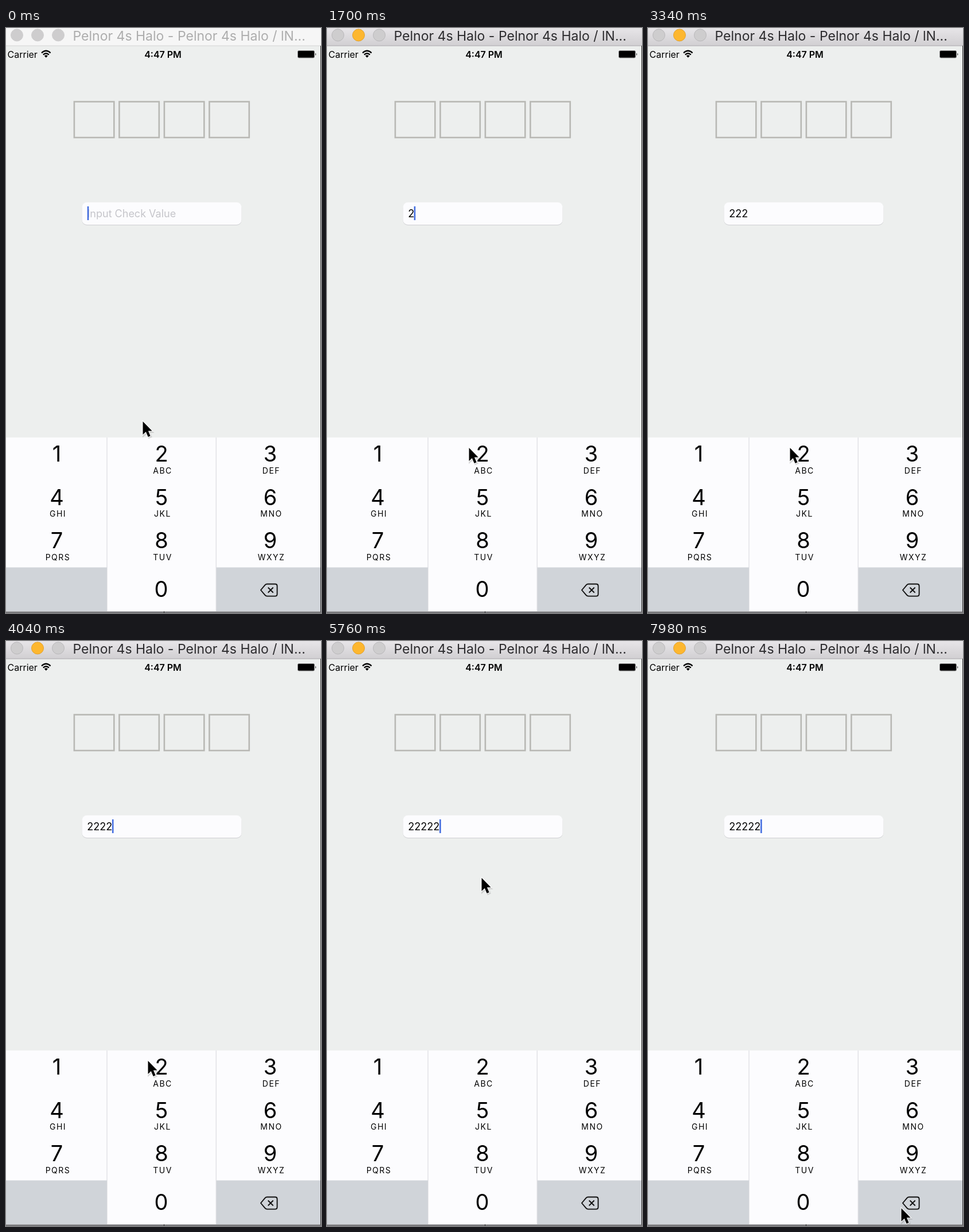
An HTML page for the animation above (8000 ms loop, 549 by 1020 pixels).

```html
<!DOCTYPE html>
<html lang="en">
<head>
<meta charset="utf-8">
<title>Passcode entry</title>
<style>
  html, body { margin: 0; width: 100%; height: 100%; overflow: hidden; background: #edefee; }
  svg { display: block; width: 549px; height: 1020px; font-family: Inter, Roboto, sans-serif; }
  .digit { font-size: 38px; text-anchor: middle; }
  .letters { font-size: 14px; letter-spacing: 1.5px; text-anchor: middle; }
</style>
</head>
<body>
<svg viewBox="0 0 549 1020">
  <defs>
    <linearGradient id="bar" x2="0" y2="1">
      <stop stop-color="#e7e5e8"/><stop offset="1" stop-color="#d1cfd2"/>
    </linearGradient>
  </defs>
  <rect width="549" height="1020" fill="#edefee"/>

  <!-- window title bar -->
  <rect id="titleBar" width="549" height="31"/>
  <path id="barLine" d="M0 31H549" stroke-width="1"/>
  <g id="lights" stroke-width="1"></g>
  <text id="title" x="116.5" y="21.5" font-size="23">Pelnor 4s Halo - Pelnor 4s Halo / lN...</text>

  <!-- status bar -->
  <text x="2.5" y="52" font-size="16">Carrier</text>
  <g fill="none" stroke="#000" stroke-width="2.3">
    <path d="M62 43.5Q69.8 36 77.6 43.5M64.8 46.6Q69.8 42 74.8 46.6"/>
  </g>
  <path d="M66.8 48.6Q69.8 46 72.8 48.6L69.8 51.8Z"/>
  <text x="273.5" y="52" font-size="16" font-weight="600" text-anchor="middle">4:47 PM</text>
  <rect x="508.5" y="39.5" width="29" height="12.5" rx="2" stroke="#888"/>
  <path d="M539.3 43.5q2 2.3 0 4.6z"/>

  <g id="boxes" fill="none" stroke="#b8b8b4" stroke-width="2.6"></g>

  <!-- text field -->
  <rect x="132.5" y="305" width="278" height="39" rx="8.5" fill="#cfcfd2"/>
  <rect x="132.5" y="304" width="278" height="39" rx="8.5" fill="#fcfcfe"/>
  <text id="hint" x="141.5" y="329.5" font-size="18" fill="#c5c5ca">Input Check Value</text>
  <text id="value" x="141.3" y="329.5" font-size="18"></text>
  <rect id="caret" y="311" width="2.6" height="24" fill="#436de0"/>

  <!-- keypad -->
  <rect y="714" width="549" height="303" fill="#fcfcfe"/>
  <path d="M0 940.5H176V1017H0ZM366.5 940.5H549V1017H366.5Z" fill="#d0d4d9"/>
  <path d="M176 714V1017M366.2 714V1017" stroke="#d5d5da"/>
  <g id="keys"></g>
  <g fill="none" stroke="#111" stroke-width="1.9" stroke-linejoin="round">
    <path d="M444 980L451.5 971.2Q453 969.5 455 969.5H469Q472.6 969.5 472.6 973V987Q472.6 990.6 469 990.6H455Q453 990.6 451.5 988.8Z"/>
    <path d="M456.7 975.5L465.7 984.5M465.7 975.5L456.7 984.5"/>
  </g>

  <!-- window edge -->
  <rect y="1017" width="549" height="3" fill="#77777a"/>
  <path d="M0 1017.5H549" stroke="#a8a8aa"/>
  <path d="M275.5 1017V1020M548.5 31V1018" stroke="#333"/>

  <g id="pointer">
    <path d="M1 4V27L7 22L11 30L15.5 28L12 20H18Z" fill="#777" stroke="#777" stroke-width="2" opacity=".25"/>
    <path d="M.5 1V24L5.8 19L9.7 28L13.6 26.3L9.9 17.6H16.6Z" stroke="#fff" stroke-width="2" paint-order="stroke"/>
  </g>
</svg>
<script>
const $ = id => document.getElementById(id);
const set = (id, attrs) => {
  for (const k in attrs) $(id).setAttribute(k, attrs[k]);
};

const LOOP = 8000, ACTIVATE = 1200, CHAR = 11.1;
const presses = [1600, 2080, 2560, 3600, 4730];
// pointer stops: time, x, y
const stops = [
  [0, 238, 685], [150, 238, 685], [750, 247, 731], [4900, 247, 731],
  [5600, 269, 412], [5900, 269, 412], [6700, 407, 846], [7300, 441, 988], [LOOP, 441, 988]
];

$('lights').innerHTML = [19, 55, 91].map(x => `<circle cx="${x}" cy="12.4" r="10.5"/>`).join('');
$('boxes').innerHTML = [0, 1, 2, 3].map(i =>
  `<rect x="${118.9 + i * 78.5}" y="128.5" width="69.4" height="62.5"/>`).join('');

const groups = ['', 'ABC', 'DEF', 'GHI', 'JKL', 'MNO', 'PQRS', 'TUV', 'WXYZ'];
const columns = [88.5, 271, 460.5];
const digit = (x, y, n) => `<text class="digit" x="${x}" y="${y}">${n}</text>`;
$('keys').innerHTML = groups.map((g, i) => {
  const x = columns[i % 3], y = 756 + Math.floor(i / 3) * 75.5;
  return digit(x, y, i + 1) + `<text class="letters" x="${x + 2}" y="${y + 20.5}">${g}</text>`;
}).join('') + digit(270.5, 992, 0);

function pointerAt(t) {
  const i = stops.findIndex(s => s[0] > t);
  const [t0, x0, y0] = stops[i - 1], [t1, x1, y1] = stops[i];
  const p = (t - t0) / (t1 - t0), e = p * p * (3 - 2 * p);
  return [x0 + (x1 - x0) * e, y0 + (y1 - y0) * e];
}

function draw(now) {
  const t = now % LOOP, active = t >= ACTIVATE;
  set('titleBar', { fill: active ? 'url(#bar)' : '#f6f6f6' });
  set('barLine', { stroke: active ? '#aaa8ac' : '#d2d2d2' });
  set('title', { fill: active ? '#2c2b2e' : '#adadad' });
  [...$('lights').children].forEach((c, i) => {
    const lit = active && i === 1;
    c.setAttribute('fill', lit ? '#fdb72f' : '#cecdce');
    c.setAttribute('stroke', lit ? '#e2a02c' : active ? '#b9b8ba' : '#cecdce');
  });

  const done = presses.filter(p => p <= t), n = done.length;
  $('value').textContent = '2'.repeat(n);
  set('hint', { visibility: n ? 'hidden' : 'visible' });
  const sinceKey = t - (done[n - 1] || 0);
  set('caret', {
    x: 141.7 + n * CHAR - (n ? 1.2 : 0),
    visibility: sinceKey % 1000 < 520 ? 'visible' : 'hidden'
  });
  set('pointer', { transform: `translate(${pointerAt(t)})` });
}

let start;
function tick(now) {
  start ??= now;
  draw(now - start);
  requestAnimationFrame(tick);
}
draw(0);
requestAnimationFrame(tick);
</script>
</body>
</html>
```
